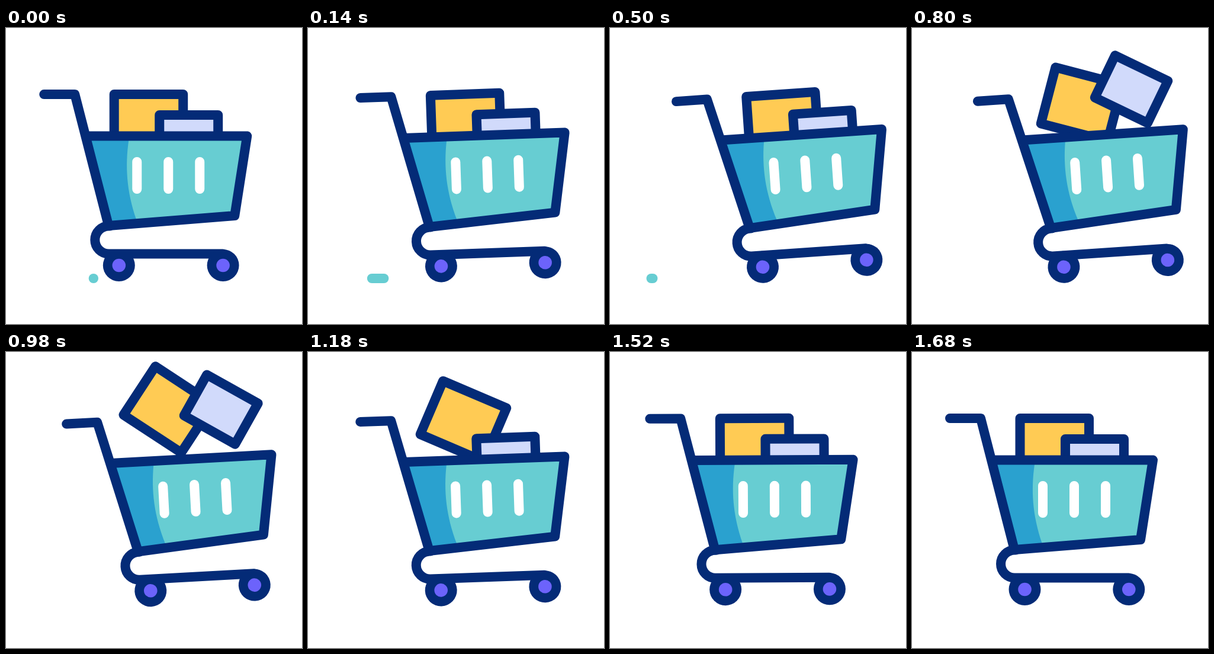
These frames come from a looping animation (500 px wide and 500 px high, 2 s). An HTML page:

```html
<!DOCTYPE html>
<html lang="en">
<head>
<meta charset="utf-8">
<title>Shopping cart</title>
<style>
  html, body { margin: 0; width: 100%; height: 100%; overflow: hidden; background: #fff; }
  svg { display: block; width: 100%; height: 100%; }
  .line { stroke: #042b77; stroke-width: 16; stroke-linecap: round; stroke-linejoin: round; }
</style>
</head>
<body>
<svg viewBox="0 0 500 500">
  <path id="streak" fill="none" stroke="#67cdd2" stroke-width="16" stroke-linecap="round"/>
  <g id="cart">
    <rect id="bigBox" class="line" x="182.5" y="112" width="116.5" height="98" fill="#ffcb54"/>
    <rect id="smallBox" class="line" x="259" y="147" width="99" height="79" fill="#d1dafb"/>
    <path d="M134 182.5H407L386 317L173 334Z" fill="#67cdd2"/>
    <path d="M134 182.5H208L207 190C201 232 203 275 220 324L221 330L173 334Z" fill="#2aa1cf"/>
    <path d="M221 226V272M274 226V272M327 226V272" stroke="#fff" stroke-width="16" stroke-linecap="round"/>
    <path class="line" fill="none" d="M64 112H116L173 334L386 317L407 182.5H135"/>
    <path class="line" fill="none" d="M175 334.5H173.5A23.5 23.5 0 0 0 173.5 381.5H366"/>
    <g fill="#042b77"><circle cx="190.5" cy="401" r="27"/><circle cx="366.3" cy="401" r="27"/></g>
    <g fill="#6c63fb"><circle cx="190.5" cy="401" r="11.3"/><circle cx="366.3" cy="401" r="11.3"/></g>
  </g>
</svg>
<script>
const LOOP = 2000;
const el = id => document.getElementById(id);
const cart = el('cart'), streak = el('streak');

const progress = (t, from, to) => Math.min(1, Math.max(0, (t - from) / (to - from)));
const smooth = u => u * u * (3 - 2 * u);
const easeOut = u => 1 - (1 - u) ** 3;

// Each box hops inside the cart, tilting as it rises.
const boxes = [
  { node: el('bigBox'), cx: 240.75, cy: 161, dx: -4, dy: -68.5, start: 560, peak: 1060, end: 1360 },
  { node: el('smallBox'), cx: 308.5, cy: 186.5, dx: 21, dy: -102, start: 560, peak: 914, end: 1170 }
];
const TILT = 39;

function draw(t) {
  const drive = easeOut(progress(t, 0, 680)) - smooth(progress(t, 680, 1680));
  cart.setAttribute('transform',
    `translate(${68.5 * drive} ${-3.3 * drive}) rotate(${-4 * drive} 278.25 400.75)`);

  for (const b of boxes) {
    const hop = smooth(progress(t, b.start, b.peak)) - smooth(progress(t, b.peak, b.end));
    b.node.setAttribute('transform',
      `translate(${b.dx * hop} ${b.dy * hop}) rotate(${TILT * hop} ${b.cx} ${b.cy})`);
  }

  const head = 148 - 80 * easeOut(progress(t, 0, 680));
  const tail = 148 - 80 * easeOut(progress(t, 80, 760));
  streak.setAttribute('d', tail - head > 0.2 ? `M${head} 423H${tail}` : '');
}

const origin = performance.now();
function tick() {
  draw((performance.now() - origin) % LOOP);
  requestAnimationFrame(tick);
}
tick();
</script>
</body>
</html>
```
